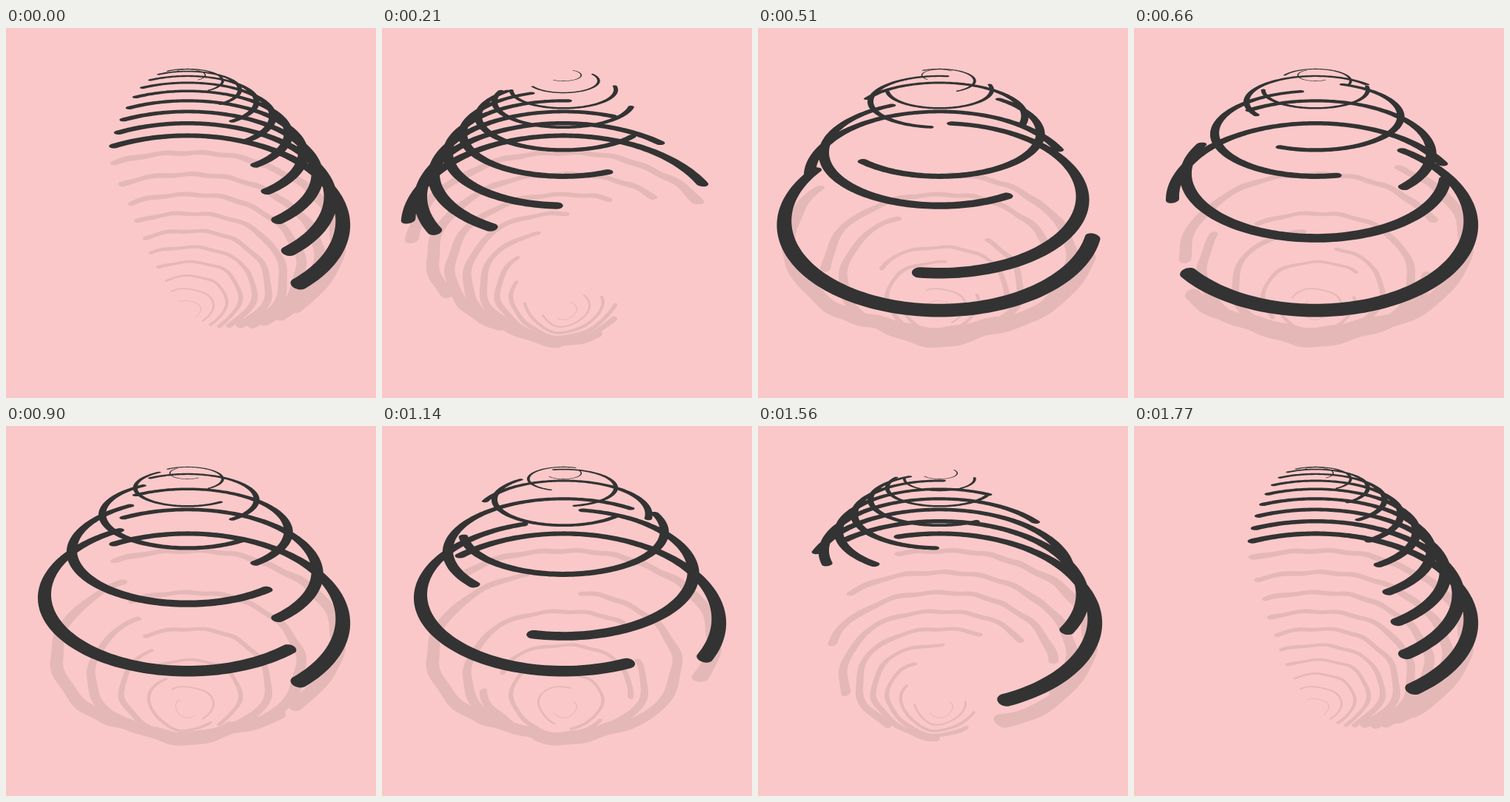
These frames come from a looping animation (500x500 px, 1.8 s). An HTML page with a canvas:

```html
<!DOCTYPE html>
<html lang="en">
<head>
<meta charset="utf-8">
<title>Turning rings</title>
<style>
  html, body { margin: 0; width: 100%; height: 100%; overflow: hidden; background: #fac8c8; }
  canvas { display: block; width: 500px; height: 500px; }
</style>
</head>
<body>
<canvas id="stage" width="500" height="500"></canvas>
<script>
const ctx = document.getElementById('stage').getContext('2d');
const LOOP = 1800, STEP = 30;
const RINGS = 10;
const START = -Math.PI / 5;

// Camera: focal length, sine and cosine of the pitch, depth and rise of the lowest ring
const FOCAL = 649, SIN = 0.565, COS = 0.825, DEPTH = 32, RISE = 0.837;
const CX = 245.3, CY = 250;
const DOME = 8.57, MIRROR_GAP = 1.57;

function project(x, z, height) {
  const depth = DEPTH - SIN * height + COS * z;
  const rise = RISE + COS * height + SIN * z;
  return [CX + FOCAL * x / depth, CY - FOCAL * rise / depth];
}

// Uneven surface of the reflection
function ripple([x, y]) {
  const swell = 0.4 + 2.6 * (y / 420) ** 3;
  return [
    x + 1.3 * Math.sin(y / 8 + x / 60) + 0.8 * Math.sin(y / 17 - x / 25),
    y + swell * Math.cos((x - 240) / 22) + 0.9 * Math.sin(x / 8 + y / 18)
  ];
}

// Half ring lying flat, with round ends, as a closed outline
function addRing(path, index, angle, reflected) {
  const lift = DOME * (1 - (index / RINGS) ** 1.9);
  const height = reflected ? -MIRROR_GAP - lift : lift;
  const half = (0.09 * index - 0.02) / 2;
  const end = angle + Math.PI;
  let first = true;

  const put = (x, z) => {
    let p = project(x, z, height);
    if (reflected) p = ripple(p);
    if (first) path.moveTo(p[0], p[1]); else path.lineTo(p[0], p[1]);
    first = false;
  };
  const edge = (radius, from, to) => {
    for (let k = 0; k <= 120; k++) {
      const a = from + (to - from) * k / 120;
      put(radius * Math.sin(a), radius * Math.cos(a));
    }
  };
  const cap = (at, from) => {
    for (let k = 1; k < 16; k++) {
      const a = from + Math.PI * k / 16;
      put(index * Math.sin(at) + half * Math.sin(a), index * Math.cos(at) + half * Math.cos(a));
    }
  };

  edge(index + half, angle, end);
  cap(end, end);
  edge(index - half, end, angle);
  cap(angle, angle + Math.PI);
  path.closePath();
}

const smooth = u => u * u * (3 - 2 * u);

function ringSet(t, reflected) {
  const path = new Path2D();
  const spread = Math.PI * smooth(1 - Math.abs(1 - 2 * t));
  for (let i = 1; i <= RINGS; i++) {
    const angle = START - 2 * Math.PI * t - (RINGS + 1 - i) * spread;
    addRing(path, i, angle, reflected);
  }
  return path;
}

function draw(now) {
  const t = Math.floor(now % LOOP / STEP) * STEP / LOOP;
  ctx.fillStyle = '#fac8c8';
  ctx.fillRect(0, 0, 500, 500);
  ctx.fillStyle = '#e5b8b8';
  ctx.fill(ringSet(t, true));
  ctx.fillStyle = '#333';
  ctx.fill(ringSet(t, false));
}

const origin = performance.now();
function tick() {
  draw(performance.now() - origin);
  requestAnimationFrame(tick);
}
tick();
</script>
</body>
</html>
```
